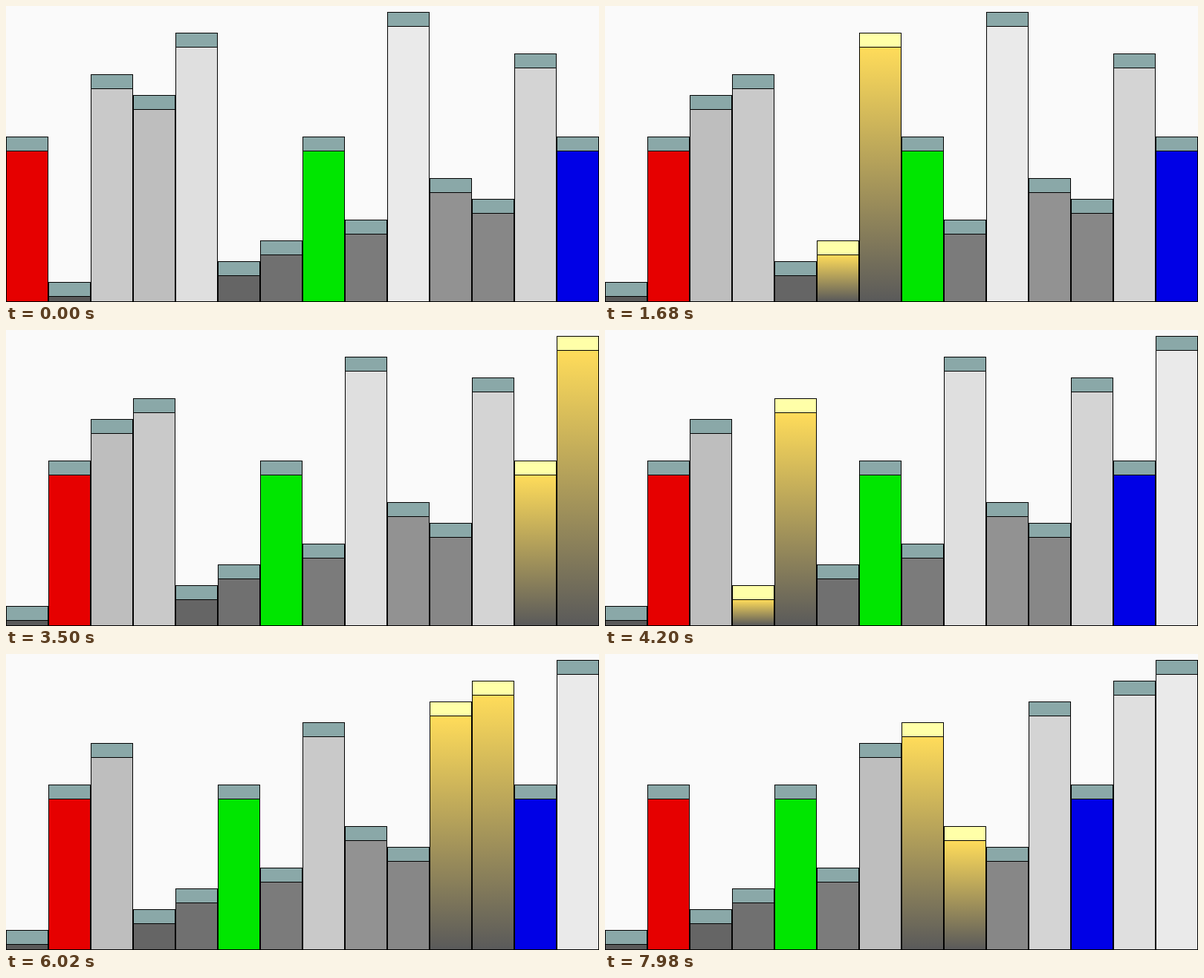
An HTML page with a canvas that plays this animation: 798 px wide and 399 px high, repeating every 8000 ms.

```html
<!DOCTYPE html>
<html>
<head>
<meta charset="utf-8">
<title>Bubble sort</title>
<style>
html, body { margin: 0; width: 100%; height: 100%; overflow: hidden; background: #fafafa; }
canvas { display: block; }
</style>
</head>
<body>
<canvas id="stage" width="798" height="399"></canvas>
<script>
const ctx = document.getElementById('stage').getContext('2d');
const LOOP = 8000, HOLD = 350, STEP = 70;
const BAR = 57, UNIT = 28, CAP = 19, BASE = 398;

const grey = v => {
  const g = Math.round(79 + 11.1 * v);
  return `rgb(${g},${g},${g})`;
};
const equalColors = ['#e60000', '#00e600', '#0000e6'];
const start = [8, 1, 11, 10, 13, 2, 3, 8, 4, 14, 6, 5, 12, 8]
  .map(v => ({ v, color: v === 8 ? equalColors.shift() : grey(v) }));

// Every comparison lasts two steps; a swap adds two more.
function bubbleSort(bars) {
  const steps = [{ bars, pair: -2 }];
  const add = pair => steps.push({ bars, pair }, { bars, pair });
  for (let end = bars.length - 1; end > 0; end--) {
    for (let i = 0; i < end; i++) {
      add(i);
      if (bars[i].v > bars[i + 1].v) {
        bars = bars.slice();
        [bars[i], bars[i + 1]] = [bars[i + 1], bars[i]];
        add(i);
      }
    }
  }
  return steps;
}
const steps = bubbleSort(start);

function box(x, y, w, h, fill) {
  ctx.fillStyle = fill;
  ctx.fillRect(x, y, w, h);
  ctx.strokeRect(x, y, w, h);
}

function drawBar({ v, color }, i, active) {
  const x = BAR * i + 0.5, top = 400 - UNIT * v + 0.5, body = top + CAP;
  let fill = color;
  if (active) {
    fill = ctx.createLinearGradient(0, body, 0, BASE);
    fill.addColorStop(0, '#ffdc5a');
    fill.addColorStop(1, '#5a5a5a');
  }
  box(x, body, BAR - 1, BASE + 0.5 - body, fill);
  box(x, top, BAR - 1, CAP, active ? '#ffffa8' : '#8aa8a8');
}

function draw(now) {
  const t = now % LOOP;
  const n = t < HOLD ? 0 : 1 + Math.floor((t - HOLD) / STEP);
  const { bars, pair } = steps[n];
  ctx.fillStyle = '#fafafa';
  ctx.fillRect(0, 0, 798, 399);
  ctx.strokeStyle = '#000';
  ctx.lineWidth = 1;
  bars.forEach((bar, i) => drawBar(bar, i, i === pair || i === pair + 1));
}

function tick() {
  draw(performance.now());
  requestAnimationFrame(tick);
}
tick();
</script>
</body>
</html>
```
